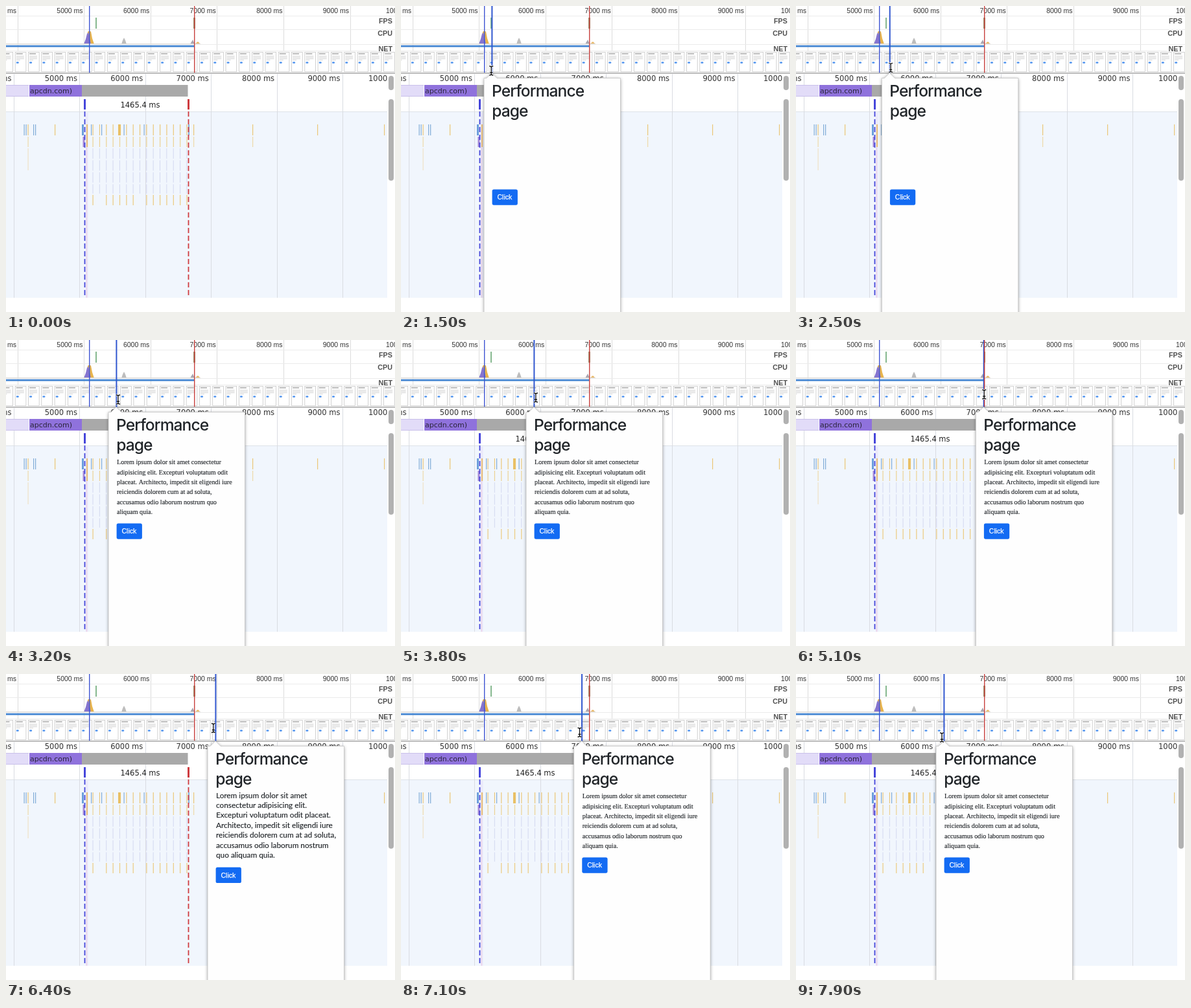
An HTML page with a canvas for the animation above (8 s loop, 600 by 473 pixels).

```html
<!DOCTYPE html>
<html>
<head>
<meta charset="utf-8">
<style>
html, body { margin: 0; width: 100%; height: 100%; overflow: hidden; background: #fff; }
canvas { display: block; width: 600px; height: 473px; }
</style>
</head>
<body>
<canvas id="stage" width="600" height="473"></canvas>
<script>
const c = document.getElementById('stage').getContext('2d');
const LOOP = 8000, STEP = 100, SHOW = 1000;
const SANS = '"Liberation Sans", Arial, sans-serif';
const WIDE = '"DejaVu Sans", Verdana, sans-serif';
const INK = '#212529';

// [time, x] and [time, y] stops for the pointer
const pathX = [[1000, 150], [1500, 140], [1900, 134], [2300, 137], [3200, 170], [4400, 240],
  [5100, 289.3], [5300, 293], [5800, 336], [6100, 336], [6400, 323], [7900, 228], [8000, 222]];
const pathY = [[1000, 100], [1500, 100], [3200, 92], [4400, 86], [5100, 84], [6400, 83.5], [7900, 98], [8000, 98]];

const serifText = ['Lorem ipsum dolor sit amet consectetur', 'adipisicing elit. Excepturi voluptatum odit',
  'placeat. Architecto, impedit sit eligendi iure', 'reiciendis dolorem cum at ad soluta,',
  'accusamus odio laborum nostrum quo', 'aliquam quia.'];
const roundText = ['Lorem ipsum dolor sit amet', 'consectetur adipisicing elit.',
  'Excepturi voluptatum odit placeat.', 'Architecto, impedit sit eligendi iure',
  'reiciendis dolorem cum at ad soluta,', 'accusamus odio laborum nostrum', 'quo aliquam quia.'];

function at(path, t) {
  let i = 1;
  while (i < path.length - 1 && path[i][0] < t) i++;
  const [t0, v0] = path[i - 1], [t1, v1] = path[i];
  const k = Math.max(0, Math.min(1, (t - t0) / (t1 - t0)));
  return v0 + (v1 - v0) * k;
}

function box(x, y, w, h, color) {
  c.fillStyle = color;
  c.fillRect(x, y, w, h);
}

function round(x, y, w, h, r, color) {
  c.fillStyle = color;
  c.beginPath();
  c.roundRect(x, y, w, h, r);
  c.fill();
}

function text(s, x, y, font, color, align = 'left') {
  c.font = font;
  c.fillStyle = color;
  c.textAlign = align;
  c.fillText(s, x, y);
}

// Text thickened by a fine outline
function heavy(s, x, y, font, color, weight) {
  text(s, x, y, font, color);
  c.strokeStyle = color;
  c.lineWidth = weight;
  c.strokeText(s, x, y);
}

function poly(color, ...p) {
  c.fillStyle = color;
  c.beginPath();
  for (let i = 0; i < p.length; i += 2) c.lineTo(p[i], p[i + 1]);
  c.fill();
}

function overview() {
  for (let i = 0; i < 6; i++) {
    const x = 16.5 + 102.6 * i;
    box(Math.round(x + 1), 0, 1, 70, '#dcdcdc');
    text(`${4000 + 1000 * i} ms`, x - .5, 10.5, `10.5px ${SANS}`, '#333', 'right');
  }
  text('10000 ms', 586, 10.5, `10.5px ${SANS}`, '#333');
  for (const y of [15, 36, 59, 69]) box(0, y, 600, 1, '#ebebeb');

  box(138, 18, 2, 17, '#86b88f');
  box(289, 18, 3, 17, '#9d9473');

  poly('#e8b44d', 124, 59, 126, 40, 128, 38.5, 131, 39.5, 133, 50, 136, 59);
  poly('#8574cf', 120, 59, 123, 51, 125, 43, 127, 41, 129, 50, 131, 59);
  poly('#bdbdbd', 178, 59, 180, 53, 182, 49, 184, 53, 186, 59);
  poly('#aaa6b0', 284, 59, 288, 52, 291, 59);
  poly('#e8b867', 291, 59, 296, 55, 300, 59);
  box(0, 58, 300, 1, '#dedbd6');
  box(0, 60.7, 290, 2.8, '#4385d2');

  for (let i = -1; i < 29; i++) thumb(13.8 + 20.3 * i);
  [['FPS', 27], ['CPU', 46], ['NET', 70]].forEach(([s, y]) => {
    box(572, y - 9, 28, 10, 'rgba(255,255,255,.8)');
    text(s, 596, y, `bold 10.8px ${SANS}`, '#505050', 'right');
  });
  box(0, 103, 600, 1.5, '#a5a5a5');
}

function thumb(x) {
  box(x, 71, 17.5, 31, '#c6c6c6');
  box(x + .8, 71.8, 15.9, 29.4, '#fff');
  box(x + 2, 73.2, 10, 1.3, '#999');
  for (let y = 77; y < 85; y += 2) box(x + 2, y, y > 82 ? 6 : 12, 1, '#d6d6d6');
  round(x + 2, 86.2, 4, 2.6, 1, '#4f93ee');
}

function flames() {
  const bars = (xs, y, h, color, w = 1.2) => xs.forEach(x => box(x, y, w, h, color));
  const cols = Array.from({ length: 15 }, (_, i) => 133.5 + 10.35 * i);
  const orange = '#ebc778', blue = '#82add8';

  box(122.5, 165, 4, 286, 'rgba(205,180,235,.2)');
  box(124, 205, 1, 246, 'rgba(240,170,200,.45)');
  bars(cols, 183, 17, orange);
  bars(cols, 202, 16, '#ecd292');
  c.setLineDash([16, 2.5]);
  for (const x of cols) {
    c.strokeStyle = '#d3d8f0';
    c.lineWidth = 1;
    c.beginPath();
    c.moveTo(x + .5, 220);
    c.lineTo(x + .5, 290);
    c.stroke();
  }
  c.setLineDash([]);
  bars(cols.filter((x, i) => i != 1 && i != 7), 292, 16, '#ecca7e');

  bars([27.5, 30.5, 42, 45, 131, 147, 181.5, 212.5], 183, 17, blue);
  bars([33.5, 75, 289, 380, 480, 583], 183, 17, orange);
  bars([33.5, 289, 380], 202, 16, '#eed9a8');
  bars([33.5], 220, 34, '#efe2c5');
  bars([173], 183, 17, '#e9c066', 4);
  bars([117], 183, 17, '#6d9fdb', 3);
  bars([124], 183, 35, '#e7bb76', 2);
  bars([118.5], 202, 16, '#a68ad8', 3);
  bars([281], 183, 17, '#82add8', 2);
}

function marker(x, color) {
  box(x - 1.5, 144, 3, 16, color);
  c.strokeStyle = color;
  c.lineWidth = 1.8;
  c.setLineDash([8, 4]);
  c.beginPath();
  c.moveTo(x, 163);
  c.lineTo(x, 451);
  c.stroke();
  c.setLineDash([]);
}

function timeline() {
  box(0, 164, 588, 287, '#f1f6fd');
  box(0, 163, 588, 1, '#dde2e8');
  for (let i = 0; i < 6; i++) {
    const x = 12 + 101.4 * i;
    box(Math.round(x), 105, 1, 346, '#d9dce2');
    text(`${4000 + 1000 * i} ms`, x - 3.5, 115.5, `11.5px ${WIDE}`, '#333', 'right');
  }
  c.save();
  c.beginPath();
  c.rect(0, 105, 588.5, 16);
  c.clip();
  text('10000 ms', 559, 115.5, `11.5px ${WIDE}`, '#333');
  c.restore();

  box(0, 122, 35, 18, '#e2dcf8');
  box(0, 122, 35, 1, '#c9c0ea');
  box(0, 139, 35, 1, '#c9c0ea');
  box(36, 122, 81, 18, '#8f72dc');
  box(117, 122, 163.5, 18, '#a9a9a9');
  text('apcdn.com)', 37, 135, `11px ${WIDE}`, '#292438');
  flames();
  text('1465.4 ms', 207, 157, `11.5px ${WIDE}`, '#222', 'center');
  marker(121.5, '#4545da');
  marker(281.5, '#cf3c40');
  round(590, 108, 8, 22, 4, '#b1b1b1');
  round(590, 144, 8, 126, 4, '#b1b1b1');
}

function popup(x) {
  c.save();
  c.shadowColor = 'rgba(0,0,0,.4)';
  c.shadowBlur = 5;
  c.shadowOffsetY = 1;
  c.beginPath();
  [[x - 12, 111.5], [x - 8, 111.5], [x, 103.5], [x + 8, 111.5], [x + 198.5, 111.5],
    [x + 198.5, 485], [x - 12, 485]].forEach(p => c.lineTo(...p));
  c.closePath();
  c.fillStyle = '#fefefe';
  c.fill();
  c.restore();
  c.strokeStyle = '#c4c4c4';
  c.lineWidth = .8;
  c.stroke();

  const left = x + 1;
  c.letterSpacing = '-0.95px';
  text('Performance', left - 1, 140, '500 24.6px Inter, sans-serif', INK);
  text('page', left - .7, 170.5, '500 24.6px Inter, sans-serif', INK);
  c.letterSpacing = '0px';

  const rounded = x > 305;
  if (x > 152) {
    const lines = rounded ? roundText : serifText;
    const font = rounded ? '11.8px Lato, sans-serif' : '10.12px "Liberation Serif", Times, serif';
    const top = rounded ? 191.7 : 192.3;
    lines.forEach((s, i) => heavy(s, left, top + 15.36 * i, font, INK, .15));
  }

  const y = rounded ? 298.8 : 283.4;
  round(left - .4, y, 39.3, 24.3, 2.6, '#136bf3');
  heavy('Click', left + 7.5, y + 16, `10.5px ${SANS}`, '#fff', .25);
}

function pointer(x, y) {
  const stem = (color, w) => {
    c.strokeStyle = color;
    c.lineWidth = w;
    c.beginPath();
    for (const s of [-1, 1]) {
      c.moveTo(x - 3, y + 7 * s);
      c.quadraticCurveTo(x, y + 7 * s, x, y + 5 * s);
      c.quadraticCurveTo(x, y + 7 * s, x + 3, y + 7 * s);
    }
    c.moveTo(x, y - 6);
    c.lineTo(x, y + 6);
    c.moveTo(x - 2, y + 3);
    c.lineTo(x + 2, y + 3);
    c.stroke();
  };
  stem('#fff', 3);
  stem('#111', 1.3);
}

function draw(now) {
  const t = Math.floor(now % LOOP / STEP) * STEP;
  const x = at(pathX, t), shown = t >= SHOW;
  box(0, 0, 600, 473, '#fff');
  overview();
  timeline();
  box(128, 0, 1.4, 103, '#3f55d2');
  if (shown) box(x - .6, 0, 2, 104, '#3157cf');
  box(290, 0, 1.4, 103, '#c8423f');
  if (shown) {
    popup(x);
    pointer(at(pathX, t + 50), at(pathY, t));
  }
  requestAnimationFrame(tick);
}

const start = performance.now();
function tick() {
  draw(performance.now() - start);
}
tick();
</script>
</body>
</html>
```
